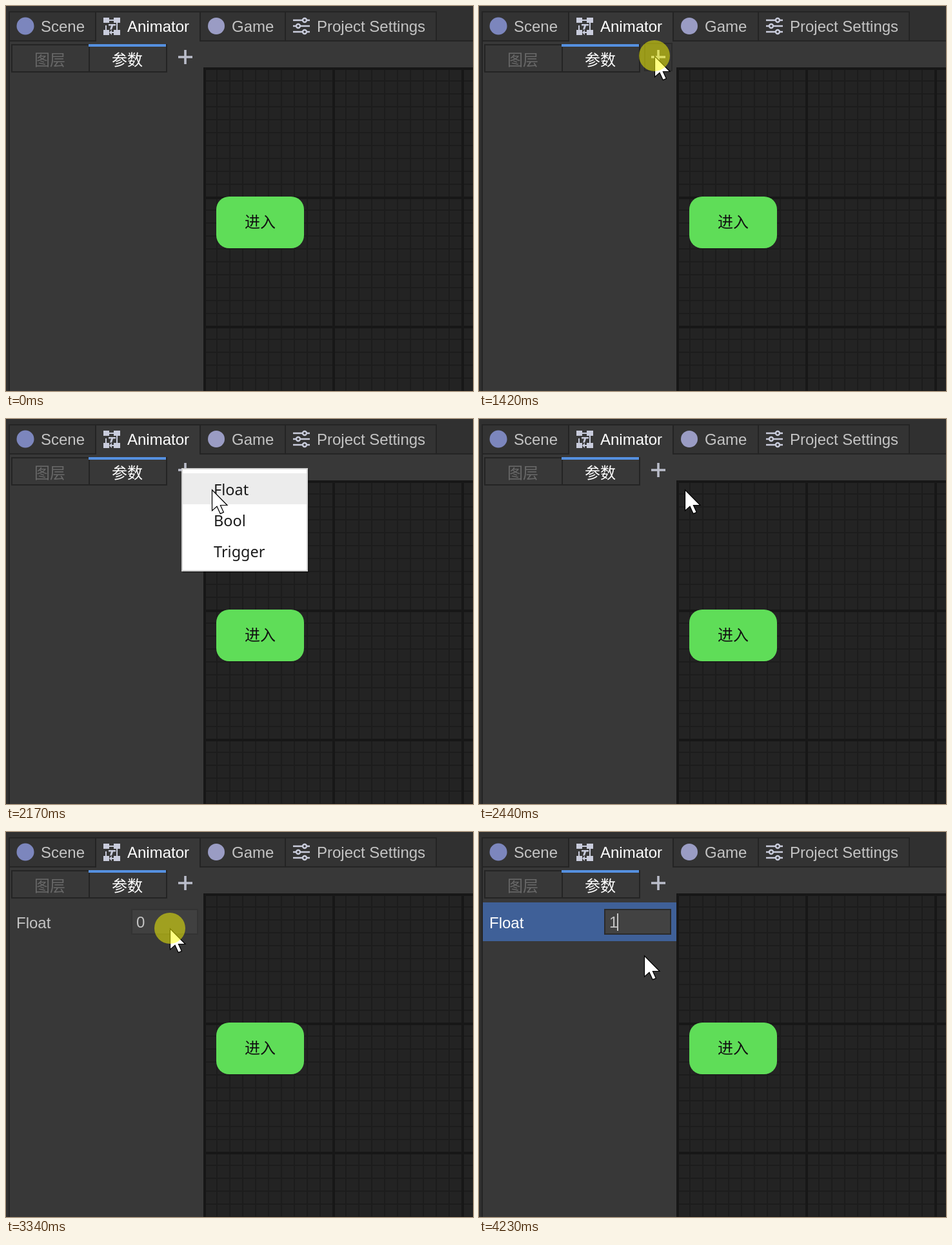
Animation of 724x596 px, one loop 4.3 s. Source, as an HTML page:

```html
<!DOCTYPE html>
<html lang="zh">
<head>
<meta charset="utf-8">
<title>Animator parameters</title>
<style>
html, body { margin: 0; width: 100%; height: 100%; overflow: hidden; background: #303030; }
svg { display: block; width: 724px; height: 596px; }
text { font: 24px "Liberation Sans", Arial, sans-serif; fill: #c4c4c4; }
.cjk { font-family: "Noto Sans CJK SC", "Noto Sans CJK", sans-serif; text-anchor: middle; }
.menu text { font: 23.5px "Noto Sans", "Open Sans", sans-serif; fill: #1b1b1b; }
.edge { fill: none; stroke: #242424; stroke-width: 2; }
.icon { fill: none; stroke: #c9ccdc; stroke-width: 2.4; }
text.on { fill: #fff; }

/* one 4300 ms loop, every change is a hard step */
.anim { opacity: 0; animation: 4300ms step-end infinite; }
.pointer { animation-name: pointer; }
.press { animation-name: press; }
.hover { animation-name: hover; }
.pushed { animation-name: pushed; }
.menu { animation-name: menu; }
.item { animation-name: item; }
.param { animation-name: param; }
.chosen { animation-name: chosen; }
.zero { animation-name: zero; }
.marked { animation-name: marked; }
.typed { animation-name: typed; }

@keyframes press {
  0%, 36.04%, 56.74%, 80.69% { opacity: 0; }
  31.39%, 55.11%, 77.67% { opacity: 1; }
}
@keyframes hover { 0%, 33.02% { opacity: 0; } 16.04% { opacity: 1; } }
@keyframes pushed { 0%, 37.67% { opacity: 0; } 33.02% { opacity: 1; } }
@keyframes menu { 0%, 56.74% { opacity: 0; } 37.67% { opacity: 1; } }
@keyframes item { 0%, 56.74% { opacity: 0; } 43.95% { opacity: 1; } }
@keyframes param { 0% { opacity: 0; } 59.76%, 100% { opacity: 1; } }
@keyframes chosen { 0% { opacity: 0; } 80.69%, 100% { opacity: 1; } }
@keyframes zero { 0%, 88.37% { opacity: 0; } 59.76% { opacity: 1; } }
@keyframes marked { 0%, 88.37% { opacity: 0; } 80.69% { opacity: 1; } }
@keyframes typed { 0% { opacity: 0; } 88.37%, 100% { opacity: 1; } }

@keyframes pointer {
  0% { opacity: 0; transform: translate(590px, 185px); }
  4.65% { opacity: 1; transform: translate(590px, 185px); }
  6.27% { opacity: 1; transform: translate(390px, 104px); }
  7.9% { opacity: 1; transform: translate(181px, 42px); }
  11.39% { opacity: 1; transform: translate(190px, 41px); }
  13.02% { opacity: 1; transform: translate(215px, 54px); }
  14.41% { opacity: 1; transform: translate(243px, 72px); }
  16.04% { opacity: 1; transform: translate(262px, 84px); }
  17.67% { opacity: 1; transform: translate(268px, 81px); }
  20.69%, 37.67% { opacity: 1; transform: translate(272px, 77px); }
  39.3% { opacity: 1; transform: translate(271px, 92px); }
  42.32% { opacity: 1; transform: translate(270px, 113px); }
  43.95% { opacity: 1; transform: translate(276px, 121px); }
  45.58% { opacity: 1; transform: translate(290px, 125px); }
  47.2% { opacity: 1; transform: translate(305px, 119px); }
  48.83% { opacity: 1; transform: translate(315px, 113px); }
  50.46%, 56.74% { opacity: 1; transform: translate(319px, 109px); }
  58.37% { opacity: 1; transform: translate(315px, 113px); }
  59.76% { opacity: 1; transform: translate(304px, 123px); }
  61.39% { opacity: 1; transform: translate(286px, 139px); }
  63.02% { opacity: 1; transform: translate(268px, 153px); }
  64.65% { opacity: 1; transform: translate(258px, 164px); }
  66.51% { opacity: 1; transform: translate(254px, 168px); }
  73.02% { opacity: 1; transform: translate(254px, 160px); }
  74.65%, 83.72% { opacity: 1; transform: translate(254px, 149px); }
  85.34% { opacity: 1; transform: translate(254px, 150px); }
  86.97% { opacity: 1; transform: translate(255px, 153px); }
  88.37% { opacity: 1; transform: translate(257px, 158px); }
  90% { opacity: 1; transform: translate(260px, 164px); }
  91.62% { opacity: 1; transform: translate(262px, 169px); }
  93.02% { opacity: 1; transform: translate(264px, 174px); }
  94.65% { opacity: 1; transform: translate(265px, 179px); }
  96.74% { opacity: 1; transform: translate(264px, 182px); }
  98.37%, 100% { opacity: 1; transform: translate(256px, 191px); }
}
</style>
</head>
<body>
<svg viewBox="0 0 724 596">
  <defs>
    <pattern id="minor" x="306" y="95" width="20" height="20" patternUnits="userSpaceOnUse">
      <path d="M0 0H20V2H2V20H0Z" fill="#1c1c1c"/>
    </pattern>
    <pattern id="major" x="306" y="95" width="200" height="200" patternUnits="userSpaceOnUse">
      <path d="M0 0H200V4H4V200H0Z" fill="#171717"/>
    </pattern>
  </defs>

  <!-- window and tabs -->
  <rect width="724" height="596" fill="#303030"/>
  <rect x="5" y="54" width="719" height="542" fill="#383838"/>
  <rect x="5" y="9" width="662" height="45" fill="#333"/>
  <rect x="139" y="9" width="162" height="46" fill="#383838"/>
  <path class="edge" d="M5 596V9H667V54M139 9V54H5M301 9V54H724M433 9V54"/>

  <circle cx="30" cy="31" r="13.5" fill="#7c86bd"/>
  <text x="54" y="40">Scene</text>

  <g fill="#c9ccdc">
    <path d="M151 18h9v8h-9zM167 18h10v8h-10zM151 37h9v8h-9zM167 37h10v8h-10z"/>
    <path d="M159 28h11v2.4h-4l-2 6h-3l2-6h-4z"/>
    <path d="M160 21h7v2h-7zM162 40h5v2h-5zM160 41l4-4v8zM171 26h2v11h-2zM154 30h2v7h-2z"/>
  </g>
  <text class="on" x="188" y="40">Animator</text>

  <circle cx="326" cy="31" r="13" fill="#9a9cc4"/>
  <text x="350" y="40">Game</text>

  <path class="icon" d="M445 22h14M467 22h4M445 31h4M457 31h14M445 40h14M467 40h4"/>
  <g class="icon">
    <circle cx="463" cy="22" r="3"/>
    <circle cx="453" cy="31" r="3"/>
    <circle cx="463" cy="40" r="3"/>
  </g>
  <text x="482" y="40">Project Settings</text>

  <!-- side panel -->
  <path class="edge" d="M9 60H249V102H9ZM129 60V102"/>
  <rect x="128" y="59" width="120" height="4" fill="#5590e0"/>
  <text class="cjk" x="68" y="92" style="fill:#686868">图层</text>
  <text class="cjk on" x="188" y="92">参数</text>

  <g class="anim hover">
    <rect x="257" y="58" width="42" height="42" fill="#464646" stroke="#505050" stroke-width="2"/>
  </g>
  <g class="anim pushed">
    <rect x="257" y="58" width="42" height="42" fill="#363636" stroke="#2b2b2b" stroke-width="2"/>
  </g>
  <path d="M267 79H289M278 68V90" stroke="#babdca" stroke-width="3.6"/>

  <g class="anim param">
    <text x="16" y="149">Float</text>
    <rect x="195" y="120" width="102" height="38" fill="#404040" stroke="#333" stroke-width="2"/>
  </g>
  <g class="anim chosen">
    <rect x="6" y="109" width="300" height="60" fill="#3f6098"/>
    <text class="on" x="16" y="149">Float</text>
    <rect x="195" y="120" width="102" height="38" fill="#424242" stroke="#2b2b2b" stroke-width="2"/>
  </g>
  <rect class="anim marked" x="202" y="126" width="14" height="27" fill="#4a6da8"/>
  <text class="anim zero" x="202" y="148">0</text>
  <g class="anim typed">
    <text x="202" y="148">1</text>
    <rect x="214" y="126" width="2" height="27" fill="#c4c4c4"/>
  </g>

  <!-- graph -->
  <rect x="306" y="95" width="418" height="501" fill="#232323"/>
  <rect x="306" y="95" width="418" height="501" fill="url(#minor)"/>
  <rect x="306" y="95" width="418" height="501" fill="url(#major)"/>
  <rect x="326" y="295" width="136" height="80" rx="20" fill="#5fdd58"/>
  <text class="cjk" x="394" y="343" style="fill:#111">进入</text>

  <!-- popup menu -->
  <g class="anim menu">
    <rect x="274" y="78" width="196" height="160" fill="#000" opacity=".25"/>
    <rect x="273" y="77" width="194" height="158" fill="#fff" stroke="#d2d2d2" stroke-width="2"/>
    <rect class="anim item" x="274" y="84" width="192" height="48" fill="#ececec"/>
    <text x="322" y="118">Float</text>
    <text x="322" y="166">Bool</text>
    <text x="322" y="214">Trigger</text>
  </g>

  <g class="anim pointer">
    <path d="M.5 .8V33L8 26.2L13.2 37.6L18.4 35.4L13.4 24.5H24Z" fill="#fff" stroke="#000" stroke-width="1.2"/>
    <circle class="anim press" r="24" fill="#ff0" fill-opacity=".5"/>
  </g>
</svg>
</body>
</html>
```
